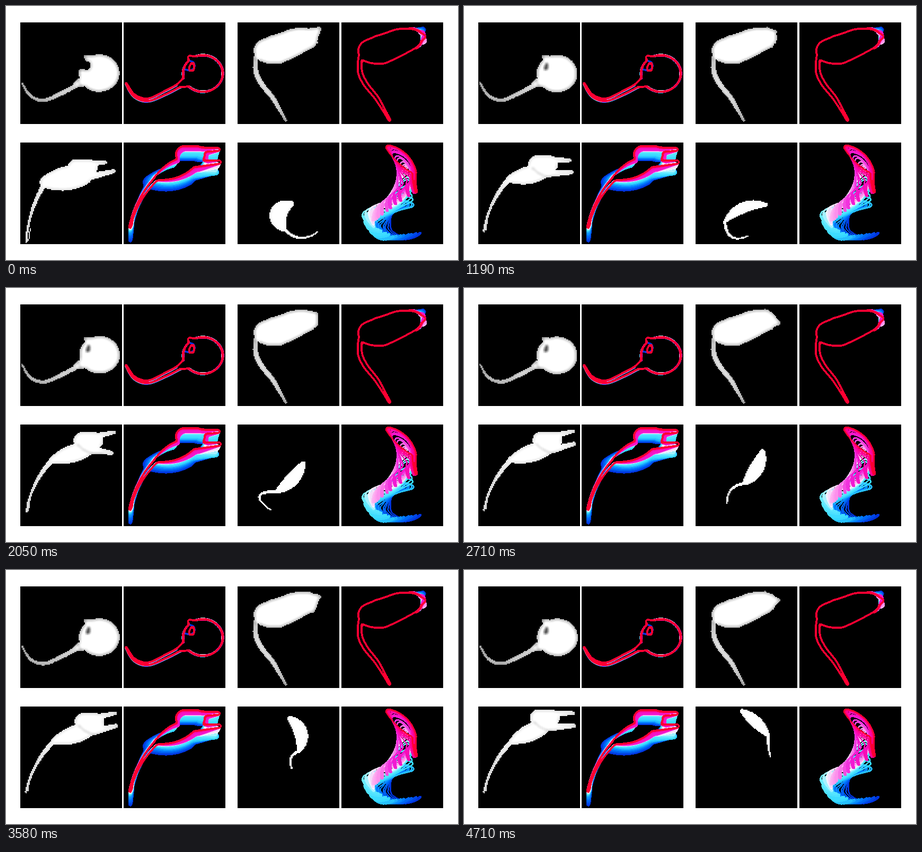
A matplotlib script that plays this animation: 853x480 px, repeating every 4.78 s.

```python
import numpy as np
import matplotlib.pyplot as plt
from matplotlib.animation import FuncAnimation

WIDTH, HEIGHT, SIZE = 853, 480, 192
LOOP, TICK = 4780, 20
# The picture holds for 3 or 2 ticks in turn, with two quicker runs.
HOLDS = ([200, 200, 130] + [200, 130] * 6 + [200, 70, 60, 70, 140]
         + [200, 130] * 4 + [200, 130, 200, 70, 70])
STEPS = np.concatenate([[0], np.cumsum(HOLDS)])
KEYS = [0, 1190, 2050, 2710, 3580, 4040, 4640]
AXIS = np.arange(SIZE) + 0.5
X, Y = np.meshgrid(AXIS, AXIS)
rng = np.random.default_rng(4)


def at(t, *values):
    """Numbers or points keyed on KEYS, eased linearly."""
    values = np.array(values, float).reshape(len(KEYS), -1)
    mixed = np.array([np.interp(t, KEYS, column) for column in values.T])
    return mixed if len(mixed) > 1 else mixed[0]


def bow(p, q, sag=0, n=40):
    """Parabolic arc from p to q, pushed sideways by sag at its middle."""
    p, d = np.array(p, float), np.subtract(q, p)
    s = np.linspace(0, 1, n)[:, None]
    normal = np.array([-d[1], d[0]]) / np.hypot(*d)
    return p + d * s + normal * 4 * sag * s * (1 - s)


def smooth(points, n=12):
    """Catmull-Rom curve through a few points."""
    p = np.array(points, float)
    a, b, c, d = (np.roll(p, k, 0)[:, None] for k in (1, 0, -1, -2))
    a[0], d[-2] = b[0], c[-2]
    u = np.linspace(0, 1, n, endpoint=False)[None, :, None]
    q = 0.5 * (2 * b + (c - a) * u + (2 * a - 5 * b + 4 * c - d) * u**2
               + (3 * b - a - 3 * c + d) * u**3)
    return np.vstack([q[:-1].reshape(-1, 2), p[-1]])


def stroke(path, *radii):
    """Sweep a disc along path; the radii are spread evenly over it."""
    s = np.linspace(0, 1, len(path))
    sizes = np.interp(s, np.linspace(0, 1, len(radii)), radii)
    mask = np.zeros((SIZE, SIZE), bool)
    for (x, y), r in zip(path, sizes):
        mask |= (AXIS - x)**2 + ((AXIS - y)**2)[:, None] <= r * r
    return mask


def blur(a, r):
    a = a.astype(float)
    for axis in (0, 1):
        a = sum(np.roll(a, k, axis) for k in range(-r, r + 1)) / (2 * r + 1)
    return a


def round_body(t):
    """Ball with a wavy tail; the mouth is open only at the start."""
    cx, cy = (149.5, 96.5) + rng.normal(0, 0.35, 2)
    body = ((X - cx) / 38.5)**2 + ((Y - cy) / 35.5)**2 <= 1
    body |= stroke(bow((124, 66), (138, 74)), 4, 10)
    wave = smooth([(4, 114), (20, 138), (46, 146), (80, 132), (112, 115)])
    wave[:, 1] += 1.5 * (1 - t / LOOP)
    dim = np.where(stroke(bow((108, 108), (116, 124)), 2), 0.85, 1.0)
    if t < 200:
        body &= ~stroke(bow((125, 82), (108, 78)), 8)
    else:
        dim[stroke(bow((130, 78), (128, 87)), 1.5, 4)] = 0.35
    neck = stroke(bow((104, 118), (115, 114)), 4, 9)
    return body | stroke(wave, 1.8, 3, 3.3, 4.3, 4.5) | neck, dim


def long_body(t):
    """Tapered body on a bent stalk, with a restless bristly snout."""
    spine = smooth([(53, 54), (75, 51), (110, 37), (133, 31)])
    mask = stroke(spine, 22, 28, 25.5, 19)
    tip = at(t, (155, 13), (150, 18), (149, 19), (157, 36), (154, 20),
             (156, 27), (156, 27))
    mask |= stroke(bow((134, 29), tip), 17, 4)
    for angle in np.linspace(-1.7, 1, 10):
        spot = (133 + 18 * np.cos(angle), 31 + 18 * np.sin(angle))
        mask |= stroke([spot], rng.uniform(0.5, 4))
    stalk = smooth([(35, 66), (35, 93), (46, 117), (68, 145), (91, 185)])
    throat = stroke(bow((33, 70), (48, 78)), 3, 1)
    return mask | stroke(stalk, 4, 5, 5, 4.6, 2.6), np.where(throat, 0.85, 1.0)


def forked_body(t):
    """Rump, torso and two arms, trailing a long tail."""
    rump = at(t, (49, 75), (58, 70), (60, 68), (62, 67), (64, 66), (64, 66), (64, 66))
    torso = at(t, (106, 48), (111, 41), (117, 31), (119, 30), (119, 29), (114, 23), (114, 22))
    upper = at(t, (161, 38), (173, 34), (178, 15), (180, 13), (180, 13), (180, 13), (180, 13))
    lower = at(t, (176, 55), (176, 57), (172, 54), (181, 37), (181, 37), (181, 37), (181, 37))
    tip = at(t, (12, 188), (11, 168), (12, 165), (11, 162), (11, 162), (11, 162), (11, 162))
    plump = np.interp(t, KEYS[:2], [12, 6])
    belly = plump + 11 * np.sin(np.linspace(0, 0.8 * np.pi, 12))
    mask = stroke(bow(rump, torso + [12, 15]), *belly)
    mask |= stroke(bow(torso, torso + [24, 0]), 16)
    mask |= stroke(bow(torso + [24, -8], upper), 6, 3.5)
    mask |= stroke(bow(torso + [22, 18], lower), 7, 4)
    mask |= stroke(bow(rump, tip, 8), 5, 3, 2)
    mask |= stroke(bow(tip + [7, -24], tip + [4, -2]), 1)
    fold = stroke(bow(torso + [-8, 8], torso + [38, 25], 6), 1.6)
    return mask, 1 - 0.14 * min(1, t / 800) * fold


def swimmer(t):
    """Small creature given by head, neck and tail tip."""
    head = at(t, (101, 116), (133, 118), (124, 74), (127, 52), (99, 23), (97, 13), (88, 9))
    neck = at(t, (89, 165), (56, 150), (74, 127), (92, 112), (116, 85), (133, 63), (138, 56))
    tip = at(t, (151, 170), (100, 177), (63, 162), (60, 150), (103, 118), (138, 97), (142, 95))
    arch = at(t, -18, -11, 6, 6, 13, 1, 3)
    curl = at(t, 13, 18, 28, 11, 9, 2, 2)
    girth = at(t, 16.5, 10.5, 12.5, 13.5, 13, 12, 11)
    profile = girth * np.sin(np.pi * np.linspace(0.05, 0.92, 20))**0.75
    mask = stroke(bow(neck, head, arch), *profile)
    return mask | stroke(bow(neck, tip, curl, 70), 3, 2.2, 1.4), np.ones_like(X)


def shaded(mask, dim, edge):
    """Grey relief on a coarse grid, darker toward the outline."""
    cells = mask[1::2, 1::2]
    core = np.clip((blur(cells, 3) - 0.35) / 0.6, 0, 1)
    grey = cells * (edge + (255 - edge) * core) * blur(dim[1::2, 1::2], 1)
    return np.kron(grey, np.ones((2, 2)))[..., None]


def age_color(u):
    """Blue through cyan, white and magenta to red."""
    stops = [0, 0.14, 0.27, 0.41, 0.47, 0.56, 0.7, 0.86, 1]
    red = [0, 0, 50, 100, 240, 255, 240, 255, 255]
    green = [50, 120, 215, 235, 250, 170, 30, 0, 0]
    blue = [220, 255, 255, 255, 255, 240, 220, 150, 50]
    return [np.interp(u, stops, channel) for channel in (red, green, blue)]


# shape, left, top, trace left, grey at the edge, outline band
PANELS = [
    (round_body, 27, 31, 222, 160, (0.35, 0.9)),
    (long_body, 437, 31, 633, 165, (0.35, 0.9)),
    (forked_body, 27, 258, 222, 215, (0.35, 0.9)),
    (swimmer, 437, 258, 633, 250, (0.25, 0.68)),
]
poses = STEPS[:-1]
pictures = np.full((len(poses), HEIGHT, WIDTH, 3), 255, np.uint8)
for shape, left, top, trace_left, edge, (low, high) in PANELS:
    trace = np.zeros((SIZE, SIZE, 3))
    rows = slice(top, top + SIZE)
    for k, t in enumerate(poses):
        mask, dim = shape(t)
        pictures[k, rows, left:left + SIZE] = shaded(mask, dim, edge)
        near = blur(mask & (dim > 0.5), 3)
        trace[(near > low) & (near < high)] = age_color(t / poses[-1])
    pictures[:, rows, trace_left:trace_left + SIZE] = trace

fig = plt.figure(figsize=(WIDTH / 64, HEIGHT / 64), dpi=64)
ax = fig.add_axes([0, 0, 1, 1])
ax.axis("off")
view = ax.imshow(pictures[0], aspect="auto", interpolation="nearest")


def update(i):
    step = np.searchsorted(STEPS, i * TICK + TICK / 2, "right") - 1
    view.set_data(pictures[step % len(poses)])
    return [view]


anim = FuncAnimation(fig, update, frames=LOOP // TICK, interval=TICK,
                     repeat=True, repeat_delay=0)
plt.show()
```
